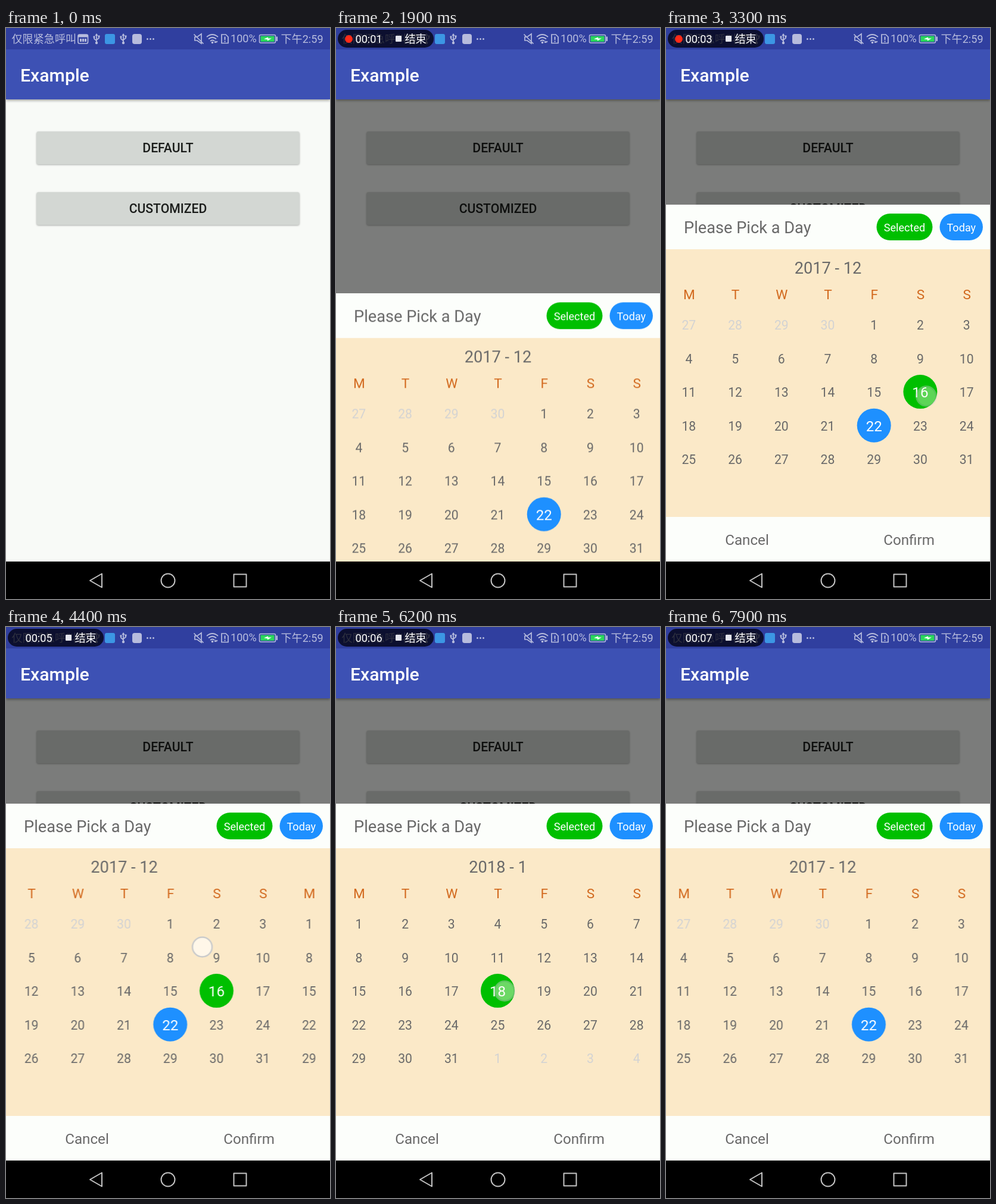
Animation, 544 px wide and 960 px high, one loop 8 s. Source, as an HTML page:

```html
<!DOCTYPE html>
<html lang="zh-CN">
<head>
<meta charset="utf-8">
<title>Day picker</title>
<style>
html, body { margin: 0; width: 100%; height: 100%; overflow: hidden; background: #000; }
svg { display: block; width: 100%; height: 100%; font-family: Roboto, "Noto Sans CJK SC", "Noto Sans CJK", sans-serif; }
.mid { text-anchor: middle; }
.caps { font-size: 21.15px; font-weight: 500; fill: #1a1c1a; }
.small { font-size: 18.1px; }
.gray { fill: #696969; }
.status { opacity: .65; fill: #fff; }
.line { fill: none; stroke: #fff; stroke-width: 1.7; }
.nav { fill: none; stroke: #c4c4c4; stroke-width: 2; stroke-linejoin: round; }
.btn { fill: #d3d7d3; filter: drop-shadow(0 1.5px 1.5px rgba(0,0,0,.32)); }
.month { font-size: 27.2px; }
.week { font-size: 22.67px; fill: #d2691e; }
.day { font-size: 21.15px; }
.other { fill: #d3d3d3; }
.picked { font-size: 24.18px; fill: #fff; }

.anim { animation: 8s linear infinite; }
.step { animation-timing-function: step-end; }
.pill { animation-name: pill; }
.digit { animation-name: tick; }
.rec { animation-name: blink; }
.press { animation-name: press; }
.dim { animation-name: dim; }
.sheet { animation-name: slide; }
.pages { animation-name: scroll; }
.first { animation-name: first; }
.second { animation-name: second; }
.touch { animation-name: touch; }

@keyframes pill { 0% { opacity: 0 } 2.5%, 100% { opacity: 1 } }
@keyframes tick {
  0% { transform: translateY(0) }
  13.75% { transform: translateY(-30px) }
  26.25% { transform: translateY(-60px) }
  35% { transform: translateY(-90px) }
  43.75% { transform: translateY(-120px) }
  52.5% { transform: translateY(-150px) }
  73.75% { transform: translateY(-180px) }
  93.75%, 100% { transform: translateY(-210px) }
}
@keyframes blink {
  0%, 13.75%, 26.25%, 35%, 43.75%, 52.5%, 73.75%, 93.75%, 100% { opacity: 0 }
  7.5%, 20%, 30.6%, 39.4%, 48.1%, 62.5%, 83.75% { opacity: 1 }
}
@keyframes press {
  0%, 15.5% { opacity: 0 }
  18%, 20% { opacity: 1 }
  22.5%, 100% { opacity: 0 }
}
@keyframes dim { 0% { opacity: 0 } 21.25%, 100% { opacity: 1 } }
@keyframes slide {
  0% { transform: translateY(600px) }
  21.25% { transform: translateY(600px); animation-timing-function: cubic-bezier(.5,1,.89,1) }
  26.25%, 100% { transform: translateY(0) }
}
@keyframes scroll {
  0%, 53.125% { transform: translateX(0) }
  56.875% { transform: translateX(-146px); animation-timing-function: cubic-bezier(.22,1,.36,1) }
  64.4% { transform: translateX(-544px) }
  95% { transform: translateX(-544px); animation-timing-function: cubic-bezier(.33,1,.68,1) }
  100% { transform: translateX(0) }
}
@keyframes first { 0% { opacity: 0 } 39.4% { opacity: 1 } 75.7%, 100% { opacity: 0 } }
@keyframes second { 0% { opacity: 0 } 75.7%, 100% { opacity: 1 } }
@keyframes touch {
  0%, 14.3% { transform: translate(390px,201px); opacity: 0 }
  14.4%, 17% { transform: translate(390px,201px); opacity: .9 }
  18.7% { transform: translate(390px,201px); opacity: 0 }
  18.8%, 39% { transform: translate(437px,619px); opacity: 0 }
  39.1%, 40.3% { transform: translate(437px,619px); opacity: .9 }
  42.1% { transform: translate(437px,619px); opacity: 0 }
  42.2%, 52.7% { transform: translate(420px,538px); opacity: 0 }
  52.8% { transform: translate(420px,538px); opacity: .95 }
  53.125% { transform: translate(403px,538px); opacity: .95 }
  56.875% { transform: translate(257px,538px); opacity: .95 }
  57% { transform: translate(250px,538px); opacity: 0 }
  57.1%, 75.6% { transform: translate(283px,612px); opacity: 0 }
  75.7%, 76.5% { transform: translate(283px,612px); opacity: .9 }
  78.7% { transform: translate(283px,612px); opacity: 0 }
  78.8%, 92.4% { transform: translate(496px,335px); opacity: 0 }
  92.5%, 94.5% { transform: translate(496px,335px); opacity: .9 }
  96.5%, 100% { transform: translate(496px,335px); opacity: 0 }
}
</style>
</head>
<body>
<svg viewBox="0 0 544 960">
  <defs>
    <linearGradient id="ripple">
      <stop offset=".48" stop-opacity=".06"/>
      <stop offset=".48" stop-opacity=".085"/>
      <stop offset="1" stop-opacity=".1"/>
    </linearGradient>
    <clipPath id="clockBox"><rect x="0" y="4" width="90" height="28"/></clipPath>
    <g id="usb">
      <path class="line" d="M0 12V25M-4 15v3l4 3.5M4 14v3l-4 3"/>
      <path fill="#fff" d="M-2.6 13L0 9l2.6 4zM2.5 12.5h3v3h-3z"/>
      <circle cx="-4" cy="15" r="1.7" fill="#fff"/>
      <circle cy="25" r="2.2" fill="#fff"/>
    </g>
  </defs>

  <rect width="544" height="960" fill="#f8faf7"/>

  <!-- content -->
  <rect class="btn" x="51.5" y="174" width="441" height="55" rx="3"/>
  <rect class="btn" x="51.5" y="276" width="441" height="55" rx="3"/>
  <g class="anim press">
    <rect x="51.5" y="174" width="441" height="55" rx="3" fill="#d3d7d3" style="filter:drop-shadow(0 2px 3px rgba(0,0,0,.4))"/>
    <rect x="51.5" y="174" width="441" height="55" rx="3" fill="url(#ripple)"/>
  </g>
  <text class="mid caps" x="272" y="209">DEFAULT</text>
  <text class="mid caps" x="272" y="311">CUSTOMIZED</text>

  <!-- toolbar -->
  <rect y="36" width="544" height="84" fill="#3d51b4" style="filter:drop-shadow(0 2px 2px rgba(0,0,0,.35))"/>
  <text x="24" y="90" font-size="30.2" font-weight="500" fill="#fff">Example</text>
  <rect class="anim step dim" y="120" width="544" height="777" fill="#000" fill-opacity=".5"/>

  <!-- picker -->
  <g class="anim sheet">
    <rect y="297" width="544" height="600" fill="#fcfefb"/>
    <rect y="372" width="544" height="450" fill="#fbe9c8"/>
    <text class="gray" x="30" y="345" font-size="27.2">Please Pick a Day</text>
    <rect x="353.5" y="312" width="94" height="45" rx="22.5" fill="#00bf00"/>
    <text class="mid small" x="400.5" y="342" fill="#fff">Selected</text>
    <rect x="459.5" y="312" width="72.5" height="45" rx="22.5" fill="#1e90ff"/>
    <text class="mid small" x="495.8" y="342" fill="#fff">Today</text>
    <g class="anim pages" id="pages"></g>
    <g class="mid gray" font-size="24.18">
      <text x="136" y="869">Cancel</text>
      <text x="408" y="869">Confirm</text>
    </g>
  </g>

  <!-- status bar -->
  <rect width="544" height="36" fill="#303f9f"/>
  <g class="status small">
    <text x="9.5" y="25">仅限紧急呼叫</text>
    <rect class="line" x="121" y="11" width="16.5" height="15" rx="2.5"/>
    <path d="M121 11h16.5v4.500H121zM124 18h3v5h-3zM128 18h3v5h-3zM132 18h3v5h-3z"/>
    <use href="#usb" x="152"/>
    <use href="#usb" x="197"/>
    <rect x="212" y="10" width="16" height="17" rx="4"/>
    <circle cx="237.500" cy="18.500" r="1.500"/>
    <circle cx="242.500" cy="18.500" r="1.500"/>
    <circle cx="247.500" cy="18.500" r="1.500"/>
    <path class="line" d="M317 15h4l7-5v16l-7-5h-4zM315.500 10.500l16 16"/>
    <path class="line" d="M337 15q9.500-8 19 0M340 18.500q6.500-5.500 13 0M343 22q3.500-3 7 0"/>
    <circle cx="346.500" cy="24.500" r="1.800"/>
    <path d="M351.500 21l2 4h-4zM354 25l-1.500-3h3z"/>
    <path class="line" d="M362 11h7l4 4v10.500h-11z"/>
    <path d="M366.500 14.500h2v5.500h-2zM366.500 21.500h2v2h-2z"/>
    <text x="377" y="24">100%</text>
    <text x="461.500" y="25">下午2:59</text>
  </g>
  <rect x="166" y="10" width="17" height="17" rx="3" fill="#3c96e4"/>
  <rect x="425.500" y="11.500" width="27" height="13.500" rx="2" fill="none" stroke="#b5bbde" stroke-width="1.500"/>
  <rect x="427.500" y="13.500" width="23" height="9.500" fill="#2ad85c"/>
  <rect x="453.500" y="14.500" width="2.500" height="7.500" fill="#b5bbde"/>
  <path d="M433 18.500l7-3v2h6l-7 4v-2z" fill="#fff"/>

  <!-- recorder -->
  <g class="anim step pill">
    <rect x="3" y="3" width="161" height="30" rx="15" fill="#00000a" fill-opacity=".75"/>
    <circle class="anim step rec" cx="21.500" cy="18.500" r="6.500" fill="#ff2a18"/>
    <g class="small" fill="#fff">
      <text x="32.500" y="25">00:0</text>
      <g clip-path="url(#clockBox)"><g class="anim step digit" id="digits"></g></g>
      <rect x="100" y="13" width="10" height="10" rx="1" fill="#e4e6ee"/>
      <text x="115.500" y="25">结束</text>
    </g>
  </g>

  <!-- navigation -->
  <rect y="897" width="544" height="63"/>
  <path class="nav" d="M141 929L161 917.500V940.500Z"/>
  <circle class="nav" cx="272" cy="929" r="11.500"/>
  <rect class="nav" x="382.500" y="918.500" width="21" height="21"/>

  <circle class="anim touch" r="16.500" fill="#fffaf0" fill-opacity=".88" stroke="#c8cacc" stroke-width="2.500"/>
</svg>
<script>
const COL = 544 / 7;
const ROW = 56.55;
const pages = document.getElementById('pages');
const digits = document.getElementById('digits');

const text = (cls, x, y, value) => `<text class="${cls}" x="${x}" y="${y}">${value}</text>`;

const centre = (page, i) => [
  page * 544 + (i % 7 + .5) * COL - .5,
  499.5 + Math.floor(i / 7) * ROW
];

function mark(page, i, day, color, cls = '') {
  const [x, y] = centre(page, i);
  return `<g class="${cls}"><circle cx="${x}" cy="${y - 1}" r="28.5" fill="${color}"/>
    ${text('mid picked', x, y + 8.5, day)}</g>`;
}

// lead: trailing days of the previous month shown before day 1
function month(page, title, lead) {
  let out = text('mid month gray', page * 544 + 272, 413, title);
  [...'MTWTFSS'].forEach((name, i) => {
    out += text('mid week', centre(page, i)[0] + .5, 456, name);
  });
  for (let i = 0; i < 35; i++) {
    const n = i - lead + 1;
    const inside = n > 0 && n <= 31;
    const [x, y] = centre(page, i);
    out += text('mid day ' + (inside ? 'gray' : 'other'), x, y + 7.5, inside ? n : n < 1 ? n + 30 : n - 31);
  }
  return out;
}

pages.innerHTML =
  month(0, '2017 - 12', 4) + month(1, '2018 - 1', 0) +
  mark(0, 25, 22, '#1e90ff') +
  mark(0, 19, 16, '#00bf00', 'anim step first') +
  mark(1, 17, 18, '#00bf00', 'anim step second');

for (let n = 0; n < 8; n++) digits.innerHTML += text('', 67.4, 25 + n * 30, n);
</script>
</body>
</html>
```
